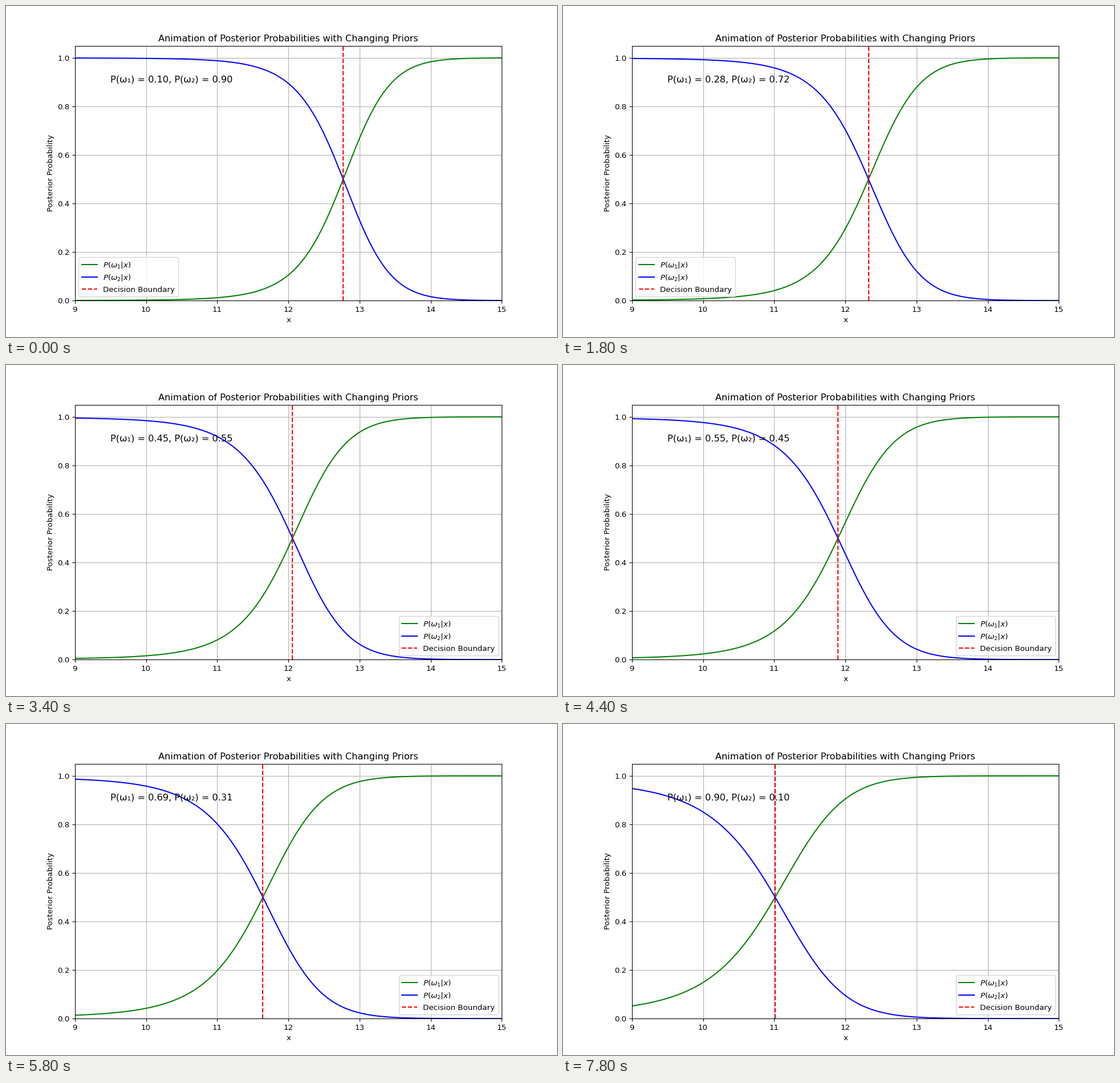
A matplotlib script for the animation above (8000 ms loop, 966 by 580 pixels).

```python
import numpy as np
import matplotlib.pyplot as plt
from matplotlib.animation import FuncAnimation

FRAMES, INTERVAL = 40, 200
MU1, SIGMA1 = 13, 1.0
MU2, SIGMA2 = 11, 0.8

x = np.linspace(9, 15, 1000)
priors = np.linspace(0.1, 0.9, FRAMES)

# Log likelihood ratio of the two Gaussians: a*x^2 + b*x + c
a = 0.5 / SIGMA2**2 - 0.5 / SIGMA1**2
b = MU1 / SIGMA1**2 - MU2 / SIGMA2**2
c = np.log(SIGMA2 / SIGMA1) + 0.5 * (MU2 / SIGMA2)**2 - 0.5 * (MU1 / SIGMA1)**2


def logit(p):
    return np.log(p / (1 - p))


def posterior(p):
    return 1 / (1 + np.exp(-(a * x**2 + b * x + c + logit(p))))


def boundary(p):
    return (-b + np.sqrt(b**2 - 4 * a * (c + logit(p)))) / (2 * a)


# 966 x 580 pixels
fig, ax = plt.subplots(figsize=(10, 6.0042), dpi=96.6)
ax.set(xlim=(9, 15), ylim=(0, 1.05), xlabel="x", ylabel="Posterior Probability",
       title="Animation of Posterior Probabilities with Changing Priors")
ax.grid(True)

line1, = ax.plot([], [], color="green", label=r"$P(\omega_1|x)$")
line2, = ax.plot([], [], color="blue", label=r"$P(\omega_2|x)$")
split = ax.axvline(boundary(priors[0]), color="red", ls="--", label="Decision Boundary")
note = ax.text(9.5, 0.9, "", fontsize=12)
ax.legend(loc="best")


def update(i):
    p = priors[i]
    post = posterior(p)
    line1.set_data(x, post)
    line2.set_data(x, 1 - post)
    split.set_xdata([boundary(p)] * 2)
    note.set_text(f"P(ω₁) = {p:.2f}, P(ω₂) = {1 - p:.2f}")
    return line1, line2, split, note


anim = FuncAnimation(fig, update, frames=FRAMES, interval=INTERVAL, repeat=True)
plt.show()
```
